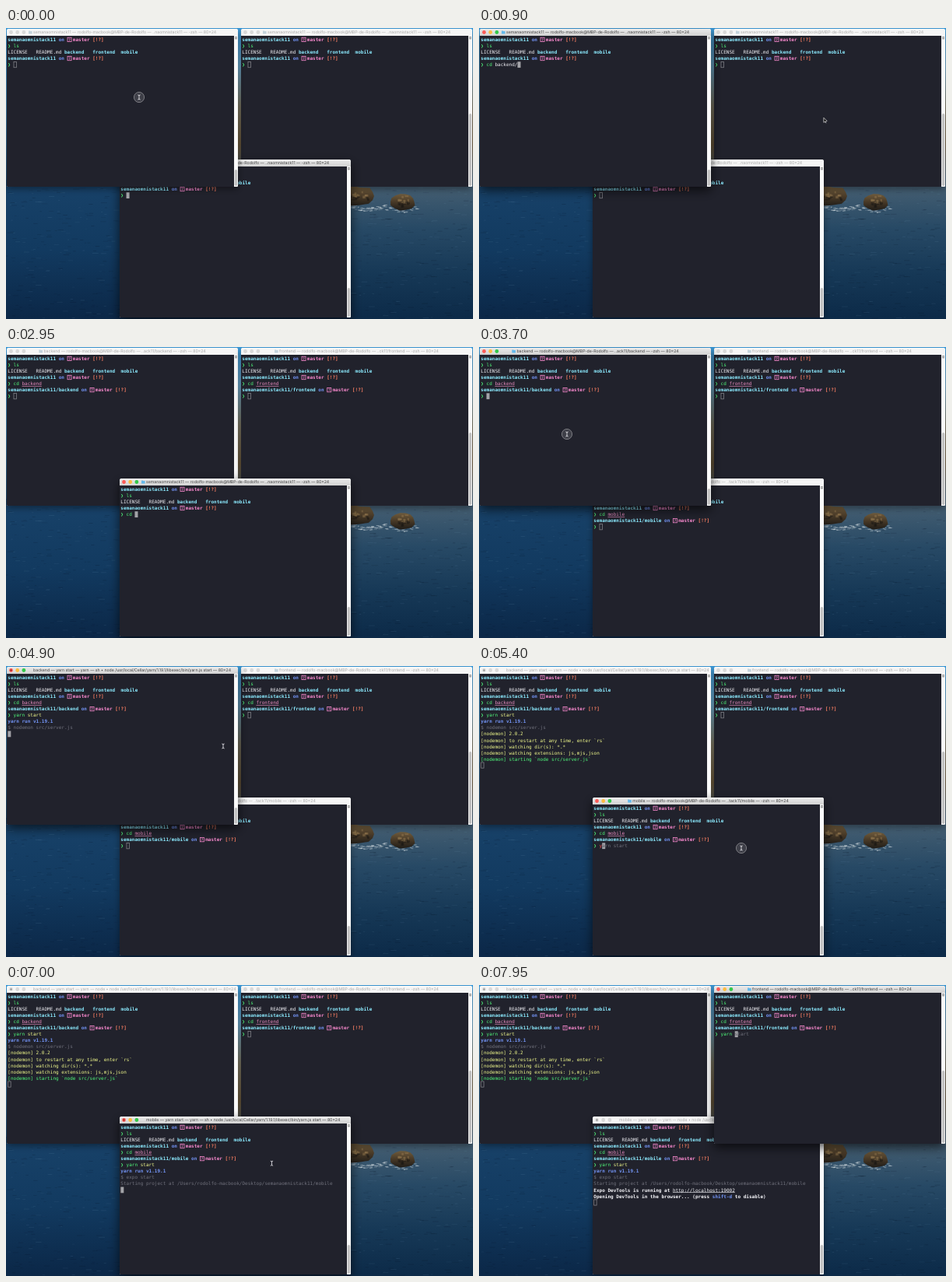
Animation of 600 by 374 pixels, one loop 8 s. Source, as an HTML page with a canvas:

```html
<!DOCTYPE html>
<html lang="en">
<head>
<meta charset="utf-8">
<title>Three terminals</title>
<style>
  html, body { margin: 0; width: 100%; height: 100%; overflow: hidden; background: #123152; }
  canvas { display: block; width: 600px; height: 374px; }
</style>
</head>
<body>
<canvas id="stage"></canvas>
<script>
const W = 600, H = 374, LOOP = 8000;
const WIN_W = 297, WIN_H = 203, BAR_H = 9, SCROLL_X = 292;
const COL = 3.63, ROW = 8.04, TEXT_X = 1.3, MONO = '"DejaVu Sans Mono", monospace';
const canvas = document.getElementById('stage');
const ctx = canvas.getContext('2d');
const dpr = window.devicePixelRatio || 1;
canvas.width = W * dpr;
canvas.height = H * dpr;

// Markup: ^ plus a style letter starts a run of text.
const styles = {
  w: ['#efeff4'], W: ['#f6f6fa', 'bold'], c: ['#8be9fd', 'bold'], b: ['#7394f5', 'bold'],
  p: ['#f587cb', 'bold'], r: ['#ff8064', 'bold'], e: ['#ff5555'], g: ['#50fa7b'],
  y: ['#f1fa8c'], d: ['#70717c'], s: ['#70717c'], u: ['#ea8cc0', '', true],
  U: ['#f6f6fa', '', true], i: ['#f587cb']
};

const ROOT = 'semanaomnistack11', CD_STEP = 80, YARN_STEP = 60;
const mark = '^g❯ ';
const prompt = dir => `^c${ROOT}${dir} ^bon ^i  ^pmaster ^r[!?]`;
const listing = '^wLICENSE   README.md ^cbackend   frontend  mobile';
const latest = (steps, t) => steps.filter(s => s[0] <= t).pop();

const shellTitle = (dir, path) => ({
  folder: true,
  text: `${dir} — rodolfo-macbook@MBP-de-Rodolfo — ..${path.slice(-13)} — -zsh — 80×24`
});
const yarnTitle = (dir, job) => ({
  running: true,
  text: `${dir} — yarn start — yarn — ${job} • node /usr/local/Cellar/yarn/1.19.1/libexec/bin/yarn.js start — 80×24`
});

// Each row is a list of [time, text] steps; the latest one is shown.
function cdRow(start, dir) {
  const typed = 'cd ' + dir.slice(0, 2);
  const row = [[0, mark]];
  for (let n = 1; n <= typed.length; n++) {
    const style = n === 1 ? '^e' : '^g';
    row.push([start + n * CD_STEP, mark + style + typed.slice(0, Math.min(n, 3)) + '^u' + typed.slice(3, n)]);
  }
  row.push([start + 6 * CD_STEP, `${mark}^gcd ^w${dir}/`], [start + 9 * CD_STEP, `${mark}^gcd ^u${dir}`]);
  return row;
}

function yarnRow(ready, start) {
  const word = 'yarn start', row = [[ready, mark]];
  for (let n = 1; n <= word.length; n++) {
    const style = n < 4 ? '^e' : '^g';
    row.push([start + (n - 1) * YARN_STEP,
      mark + style + word.slice(0, Math.min(n, 5)) + '^y' + word.slice(5, n) + '^s' + word.slice(n)]);
  }
  return row;
}

function terminal(x, y, thumb, dir, cdStart, yarnStart, script, outputs) {
  const ready = cdStart + 9 * CD_STEP + 60;
  const enter = yarnStart + 11 * YARN_STEP;
  const lastOutput = outputs.length ? outputs[outputs.length - 1][0] : 0;
  const at = (time, text) => [[time, text]];
  return {
    x, y, thumb,
    titles: [
      [0, shellTitle(ROOT, ROOT)], [ready, shellTitle(dir, `${ROOT}/${dir}`)],
      [enter, yarnTitle(dir, 'sh')], [enter + lastOutput, yarnTitle(dir, 'node')]
    ],
    rows: [
      at(0, prompt('')), at(0, mark + '^gls'), at(0, listing), at(0, prompt('')),
      cdRow(cdStart, dir), at(ready, prompt('/' + dir)), yarnRow(ready, yarnStart),
      at(enter + 150, '^byarn run v1.19.1'), at(enter + 250, '^d$ ' + script),
      ...outputs.map(([delay, text]) => at(enter + delay, text)),
      at(enter + 250, '')
    ]
  };
}

const windows = {
  A: terminal(1, 1, 181, 'backend', 250, 3900, 'nodemon src/server.js', [
    '^y[nodemon] 2.0.2',
    '^y[nodemon] to restart at any time, enter `rs`',
    '^y[nodemon] watching dir(s): *.*',
    '^y[nodemon] watching extensions: js,mjs,json',
    '^g[nodemon] starting `node src/server.js`'
  ].map(text => [590, text])),
  B: terminal(302, 1, 109, 'frontend', 1250, 7690, '', []),
  C: terminal(146, 169, 165, 'mobile', 2690, 5400, 'expo start', [
    [790, '^dStarting project at /Users/rodolfo-macbook/Desktop/semanaomnistack11/mobile'],
    [990, '^WExpo DevTools is running at ^Uhttp://localhost:19002'],
    [990, '^WOpening DevTools in the browser... (press ^bshift-d^W to disable)']
  ])
};

// Pointer stops: arrival time, place, and the window clicked there, if any.
const stops = [
  [-60, 171, 89, 'A'], [880, 444.5, 118.5, 'B'], [2500, 330, 260, 'C'], [3520, 113, 112, 'A'],
  [4890, 279, 103], [5180, 337, 234, 'C'], [6400, 337, 234], [7230, 450, 112, 'B']
];
const TRAVEL = 260, LINGER = 350, PRESS = 60, FOCUS = 120, RING = 260;

function desktop(t) {
  let order = 'BAC', focus = 'C';
  for (const [arrive, , , key] of stops) {
    if (key && t >= arrive + PRESS) order = order.replace(key, '') + key;
    if (key && t >= arrive + FOCUS) focus = key;
  }
  return { order, focus };
}

function rect(x, y, w, h, fill) {
  ctx.fillStyle = fill;
  ctx.fillRect(x, y, w, h);
}

function disc(x, y, r, fill) {
  ctx.beginPath();
  ctx.arc(x, y, r, 0, 7);
  ctx.fillStyle = fill;
  ctx.fill();
}

function gradient(y0, y1, ...colors) {
  const g = ctx.createLinearGradient(0, y0, 0, y1);
  colors.forEach((c, i) => g.addColorStop(i / (colors.length - 1), c));
  return g;
}

function seeded(seed) {
  return () => (seed = seed * 16807 % 2147483647) / 2147483647;
}

function drawRock(x, y, rx, ry, seed) {
  const random = seeded(seed);
  ctx.beginPath();
  for (let i = 0; i < 14; i++) {
    const a = i / 14 * Math.PI * 2, r = 0.85 + random() * 0.25;
    ctx.lineTo(x + Math.cos(a) * rx * r, y + Math.sin(a) * ry * r);
  }
  ctx.fillStyle = gradient(y - ry, y + ry, '#75603f', '#4a3b28', '#211d18');
  ctx.fill();
  for (let i = 0; i < 22; i++) {
    const a = random() * 7, r = random() * 0.7;
    const px = x + Math.cos(a) * rx * r, py = y + Math.sin(a) * ry * r;
    const fill = py < y + random() * 4 - 2 ? 'rgba(160,130,85,.4)' : 'rgba(15,15,15,.4)';
    rect(px - 1.5, py - 1, 2 + random() * 3, 1.5 + random() * 2, fill);
  }
}

function drawFoam(x, y, length, count) {
  const random = seeded(count);
  for (let i = 0; i < count; i++) {
    const p = random();
    const drop = Math.sin(p * Math.PI) * 4 + (random() - 0.5) * 5;
    rect(x + p * length, y + drop, 1 + random() * 4, 0.8, `rgba(205,215,220,${0.2 + random() * 0.5})`);
  }
}

function drawSea() {
  rect(0, 0, W, 200, gradient(0, 200, '#3d9fe0', '#6fa9cc', '#7f7a66', '#6d5a3c', '#3e5f7d'));
  rect(0, 0, 1, 204, gradient(0, 204, '#3d9fe0', '#4b90bd', '#1f4a70'));
  rect(0, 195, W, 179, gradient(195, H, '#184269', '#123a60', '#0b2747'));
  rect(440, 195, 160, 179, gradient(200, H, '#465f72', '#274965', '#163856', '#0c2a48'));

  const random = seeded(7);
  for (let i = 0; i < 900; i++) {
    const alpha = 0.05 + random() * 0.12;
    const light = random() < 0.4;
    rect(random() * W, 205 + random() * 168, 2 + random() * 6, 0.7,
      light ? `rgba(125,165,195,${alpha})` : `rgba(2,16,34,${alpha * 1.7})`);
  }
  drawFoam(442, 229, 44, 70);
  drawFoam(487, 231, 40, 30);
  drawRock(450, 216, 27, 13, 31);
  drawRock(510, 223, 17, 11, 58);
}

function drawTitle(title, active) {
  ctx.font = '5.2px Inter, sans-serif';
  const icon = title.folder ? 6 : 0;
  const width = ctx.measureText(title.text).width;
  const left = Math.max(148.5 - (width + icon) / 2, 34 - icon);
  if (icon) {
    const blue = active ? '#62b9ec' : '#c3d3dc';
    rect(left, 2.6, 2, 1, blue);
    rect(left, 3.1, 4.6, 3.4, blue);
  }
  ctx.fillStyle = active ? '#3f3f3f' : '#a9a9a9';
  ctx.fillText(title.text, left + icon, 6.4);
  const lights = active ? ['#fc5b57', '#fdbc40', '#34c84a'] : Array(3).fill('#d9d9d9');
  lights.forEach((c, i) => disc(5.5 + i * 8.2, 4.5, 2.4, c));
  if (title.running) disc(5.5, 4.5, 0.9, active ? '#7e1512' : '#777');
}

function drawRow(text, y) {
  let col = 0, end = 0;
  for (const run of text.split('^').slice(1)) {
    const code = run[0], body = run.slice(1), [color, weight = '', underline] = styles[code];
    const x = TEXT_X + col * COL;
    ctx.fillStyle = ctx.strokeStyle = color;
    if (code === 'i') {
      ctx.lineWidth = 0.8;
      ctx.strokeRect(x + 0.5, y - 4.9, 5, 5.4);
      ctx.font = 'bold 4.8px ' + MONO;
      ctx.fillText('?', x + 1.5, y - 0.5);
    } else {
      ctx.font = `${weight} 6.03px ${MONO}`;
      [...body].forEach((ch, i) => ctx.fillText(ch, x + i * COL, y));
      if (underline) rect(x, y + 0.9, body.length * COL, 0.6, color);
    }
    col += body.length;
    if (code !== 's') end = col;
  }
  return end;
}

function drawCursor(col, y, active, under) {
  const x = TEXT_X + col * COL;
  if (active) {
    rect(x, y - 6, COL + 0.4, 7.8, '#a3a3a8');
    ctx.fillStyle = '#55565f';
    ctx.font = '6.03px ' + MONO;
    ctx.fillText(under, x, y);
  } else {
    ctx.strokeStyle = '#8c8c92';
    ctx.lineWidth = 0.7;
    ctx.strokeRect(x + 0.4, y - 5.7, COL - 0.2, 7.2);
  }
}

function drawWindow(win, t, active) {
  ctx.save();
  ctx.translate(win.x, win.y);
  ctx.beginPath();
  ctx.roundRect(0, 0, WIN_W, WIN_H, [2.5, 2.5, 1, 1]);
  ctx.shadowColor = active ? 'rgba(0,0,0,.65)' : 'rgba(0,0,0,.4)';
  ctx.shadowBlur = (active ? 14 : 8) * dpr;
  ctx.shadowOffsetY = (active ? 5 : 3) * dpr;
  ctx.fillStyle = '#fafafa';
  ctx.fill();
  ctx.shadowColor = 'transparent';
  ctx.clip();

  rect(0, 0, WIN_W, BAR_H, active ? gradient(0, BAR_H, '#ebebeb', '#d2d2d2') : '#f6f6f6');
  drawTitle(latest(win.titles, t)[1], active);
  rect(0, BAR_H, SCROLL_X, WIN_H - BAR_H, '#21222c');
  rect(SCROLL_X + 1, 10, 3, 3.4, '#a2a2a2');
  rect(SCROLL_X + 1.5, 11.4, 2, 0.6, '#eeeeee');
  ctx.beginPath();
  ctx.roundRect(SCROLL_X + 0.8, win.thumb, 3.4, WIN_H - 1 - win.thumb, 1.7);
  ctx.fillStyle = '#c1c1c1';
  ctx.fill();

  const visible = win.rows.map(row => latest(row, t)).filter(Boolean);
  let col = 0, y = 0;
  visible.forEach(([, text], i) => {
    y = 16.1 + i * ROW;
    col = drawRow(text, y);
  });
  const hint = visible[visible.length - 1][1].split('^s')[1] || '';
  drawCursor(col, y, active, hint[0] || '');
  ctx.restore();
}

function windowAt(x, y, order) {
  return [...order].reverse().find(key => {
    const { x: left, y: top } = windows[key];
    return x >= left && x <= left + WIN_W && y >= top && y <= top + WIN_H;
  });
}

function strokePath(color, width) {
  ctx.strokeStyle = color;
  ctx.lineWidth = width;
  ctx.stroke();
}

function drawPointer(t, { order, focus }) {
  const i = stops.findLastIndex(s => t >= s[0] - TRAVEL);
  const [arrive, x1, y1, key] = stops[i];
  if (t > arrive + LINGER) return;
  const [, x0, y0] = stops[Math.max(i - 1, 0)];
  const p = Math.min(1, (t - arrive + TRAVEL) / TRAVEL), ease = p * p * (3 - 2 * p);
  const x = x0 + (x1 - x0) * ease, y = y0 + (y1 - y0) * ease;
  const pressed = key && t >= arrive + PRESS && t < arrive + RING;

  ctx.save();
  ctx.translate(x, y);
  if (pressed) {
    disc(0, 0, 6.6, 'rgba(150,150,155,.25)');
    strokePath('#8e8e94', 0.8);
  }
  ctx.beginPath();
  if (pressed || windowAt(x, y, order) === focus) {
    for (const s of [-1, 1]) {
      ctx.moveTo(-1.6, s * 3);
      ctx.lineTo(0, s * 2.4);
      ctx.lineTo(1.6, s * 3);
    }
    ctx.moveTo(0, -2.4);
    ctx.lineTo(0, 2.4);
    strokePath('#e4e4e8', 0.9);
  } else {
    ctx.moveTo(-1.6, -3.2);
    ctx.lineTo(-1.6, 2.8);
    ctx.lineTo(0.6, 1.8);
    ctx.lineTo(2.6, 1);
    ctx.closePath();
    ctx.moveTo(0.4, 1.6);
    ctx.lineTo(1.4, 3.8);
    ctx.fillStyle = '#111';
    ctx.fill();
    strokePath('#f0f0f0', 0.7);
  }
  ctx.restore();
}

function draw(t) {
  ctx.setTransform(dpr, 0, 0, dpr, 0, 0);
  ctx.textRendering = 'geometricPrecision';
  drawSea();
  const scene = desktop(t);
  for (const key of scene.order) drawWindow(windows[key], t, key === scene.focus);
  drawPointer(t, scene);
}

const began = performance.now();
function tick() {
  draw((performance.now() - began) % LOOP);
  requestAnimationFrame(tick);
}
tick();
</script>
</body>
</html>
```
